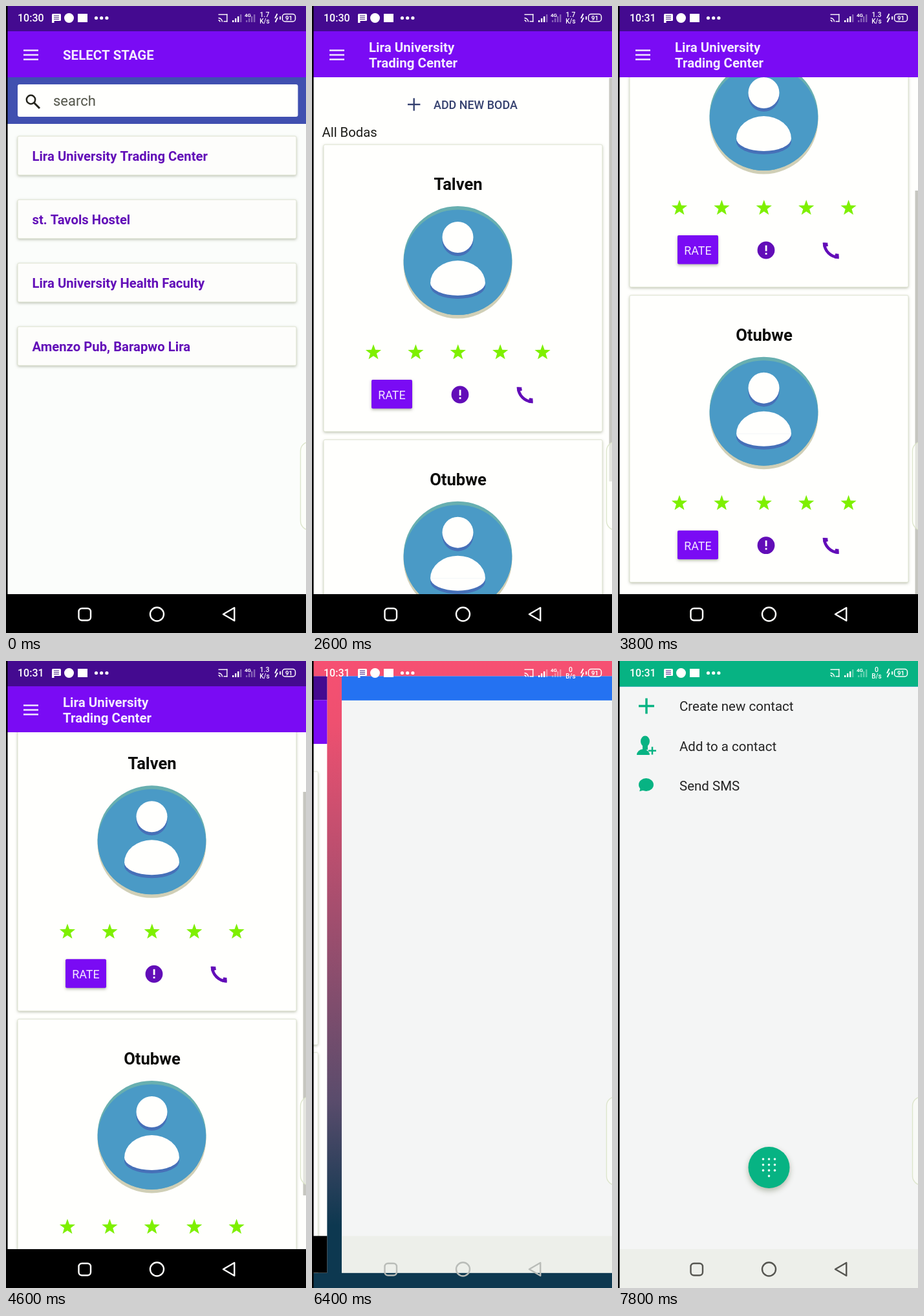
An HTML page with a canvas for the animation above (8000 ms loop, 464 px wide and 968 px high).

```html
<!DOCTYPE html>
<html lang="en">
<head>
<meta charset="utf-8">
<title>Stage picker</title>
<style>
  html, body { margin: 0; width: 100%; height: 100%; overflow: hidden; background: #000; }
  canvas { display: block; width: 464px; height: 968px; }
</style>
</head>
<body>
<canvas id="stage" width="464" height="968"></canvas>
<script>
const ctx = document.getElementById('stage').getContext('2d');
const W = 464, H = 968, LOOP = 8000, STEP = 200;
const STATUS_H = 39, BAR_BOTTOM = 110, NAV_TOP = 908;
const PURPLE = '#7a0bf4', DEEP_PURPLE = '#440a90', INK_PURPLE = '#620db8';
const PAGE = '#fbfdfb', WHITE = '#fffffd', PAPER = '#f4f5f5', GREEN = '#07b383';
const NAVY = '#35416f', BLUE = '#4a9ac6', SHADE = '#4670b8';

const ramp = (t, from, to) => Math.min(1, Math.max(0, (t - from) / (to - from)));
const smooth = (t, from, to) => {
  const p = ramp(t, from, to);
  return p * p * (3 - 2 * p);
};
const repeat = (count, draw) => {
  for (let i = 0; i < count; i++) draw(i);
};

function layer(draw) {
  ctx.save();
  draw();
  ctx.restore();
}

function fade(alpha, draw) {
  layer(() => {
    ctx.globalAlpha *= alpha;
    draw();
  });
}

function rect(x, y, w, h, color) {
  ctx.fillStyle = color;
  ctx.fillRect(x, y, w, h);
}

function box(x, y, w, h, radius, color) {
  ctx.beginPath();
  ctx.roundRect(x, y, w, h, radius);
  ctx.fillStyle = color;
  ctx.fill();
}

function outline(color, width) {
  ctx.strokeStyle = color;
  ctx.lineWidth = width;
  ctx.stroke();
}

function oval(x, y, rx, ry, color, from = 0, to = 2 * Math.PI) {
  ctx.beginPath();
  ctx.ellipse(x, y, rx, ry, 0, from, to);
  ctx.fillStyle = color;
  ctx.fill();
}

const disc = (x, y, r, color) => oval(x, y, r, r, color);

function arc(x, y, r, color, width, from = 0, to = 2 * Math.PI) {
  ctx.beginPath();
  ctx.arc(x, y, r, from, to);
  outline(color, width);
}

function line(x0, y0, x1, y1, color, width) {
  ctx.beginPath();
  ctx.moveTo(x0, y0);
  ctx.lineTo(x1, y1);
  outline(color, width);
}

function plus(x, y, r, color, width) {
  line(x - r, y, x + r, y, color, width);
  line(x, y - r, x, y + r, color, width);
}

// Corners at equal angles; their distances cycle through the given radii.
function polygon(x, y, corners, start, ...radii) {
  ctx.beginPath();
  repeat(corners, i => {
    const angle = start + i * 2 * Math.PI / corners, r = radii[i % radii.length];
    ctx.lineTo(x + r * Math.cos(angle), y + r * Math.sin(angle));
  });
  ctx.closePath();
}

function text(str, x, y, size, color, weight = 400, align = 'left') {
  ctx.font = `${weight} ${size}px Roboto, sans-serif`;
  ctx.textAlign = align;
  ctx.fillStyle = color;
  ctx.fillText(str, x, y);
}

function raised(blur, drop, draw) {
  layer(() => {
    ctx.shadowColor = 'rgba(110,120,90,.5)';
    ctx.shadowBlur = blur;
    ctx.shadowOffsetY = drop;
    draw();
  });
}

function card(y, h, color) {
  raised(4, 1.5, () => box(18, y, 431, h, 2, color));
  outline('#dfe4d2', 1);
}

function header(...titles) {
  rect(0, 0, W, STATUS_H, DEEP_PURPLE);
  rect(0, STATUS_H, W, BAR_BOTTOM - STATUS_H, PURPLE);
  repeat(3, i => rect(27, 67.3 + i * 7, 23, 2.4, '#f4ecff'));
  titles.forEach((title, i) =>
    text(title, 88, 83 + (i - (titles.length - 1) / 2) * 24.5, 20.5, '#f4ecff', 700));
}

function listScreen(rowAlpha) {
  rect(0, 0, W, H, PAGE);
  header('SELECT STAGE');
  rect(0, BAR_BOTTOM, W, 72, '#4050b0');
  box(18, 121, 433.5, 50, 3, WHITE);
  arc(38.5, 144.5, 6.7, '#24241c', 2.5);
  line(43.5, 149.5, 52, 158, '#24241c', 3);
  text('search', 73, 154, 22, '#53554a');
  const names = ['Lira University Trading Center', 'st. Tavols Hostel',
    'Lira University Health Faculty', 'Amenzo Pub, Barapwo Lira'];
  names.forEach((name, i) => {
    const y = 201 + i * 98;
    card(y, 60, '#fdfdfb');
    fade(i ? 1 : rowAlpha, () => text(name, 40.5, y + 38, 20.3, INK_PURPLE, 700));
  });
  rect(0, NAV_TOP, W, H - NAV_TOP, '#000');
}

function person(drop, color) {
  disc(225.5, 357 + drop, 24, color);
  oval(225.5, 428 + drop, 42.5, 35, color, Math.PI, 0);
  oval(225.5, 427.5 + drop, 42.5, 19.5, color, 0, Math.PI);
}

function avatar() {
  disc(225.5, 398.5, 84, '#d0cfb6');
  layer(() => {
    disc(225.5, 393, 84, '#68afb0');
    ctx.clip();
    disc(225.5, 398.5, 84, BLUE);
  });
  person(5, SHADE);
  person(0, WHITE);
}

function handset(x, y, color) {
  const right = Math.PI / 2;
  arc(x, y, 22.5, color, 4.5, right, 2 * right);
  arc(x, y, 21, color, 7.5, right, right + .3);
  arc(x, y, 21, color, 7.5, 2 * right - .3, 2 * right);
}

function riderCard(name) {
  card(214, 443, WHITE);
  text(name, 226, 284, 25.6, '#0c0c0a', 700, 'center');
  avatar();
  repeat(5, i => {
    polygon(95 + i * 65.4, 535, 10, -Math.PI / 2, 12.7, 5.2);
    ctx.fillStyle = '#7ef000';
    ctx.fill();
  });
  raised(4, 2, () => box(92, 577, 63, 44.5, 2, PURPLE));
  text('RATE', 123.5, 607, 17.9, '#f4ecff', 400, 'center');
  disc(229, 600, 13.4, INK_PURPLE);
  rect(227.7, 592.5, 2.8, 9, WHITE);
  rect(227.7, 604, 2.8, 2.8, WHITE);
  handset(341.5, 588.5, INK_PURPLE);
}

function riderScreen(scroll, barAlpha) {
  rect(0, 0, W, H, WHITE);
  layer(() => {
    ctx.translate(0, -scroll);
    plus(157.7, 152, 9.7, NAVY, 2.4);
    text('ADD NEW BODA', 188, 159, 17.9, NAVY, 500);
    text('All Bodas', 15.5, 202, 20.3, '#1c1c18');
    riderCard('Talven');
    ctx.translate(0, 455.7);
    riderCard('Otubwe');
  });
  fade(barAlpha, () => rect(459.5, 111 + scroll * .78, 4.5, 623, '#c6c6c0'));
  header('Lira University', 'Trading Center');
  rect(0, NAV_TOP, W, H - NAV_TOP, '#000');
}

function contactIcon(x, y) {
  oval(x - 2, y - 7, 7, 8.5, GREEN);
  rect(x - 6, y - 2, 8, 8, GREEN);
  oval(x - 5, y + 14, 10, 9, GREEN, Math.PI, 0);
  plus(x + 9, y + 7.5, 6, GREEN, 2.5);
}

function bubbleIcon(x, y) {
  oval(x, y, 11.5, 10, GREEN);
  polygon(x - 6, y + 6, 3, Math.PI * .75, 6);
  ctx.fill();
}

function keypadButton(x, y) {
  raised(10, 4, () => disc(x, y, 32, GREEN));
  repeat(10, i => {
    const column = i < 9 ? i % 3 - 1 : 0, row = Math.floor(i / 3);
    disc(x + column * 9, y - 13 + row * 8.7, 1.8, '#f0fff8');
  });
}

function dialerScreen(menuAlpha) {
  rect(0, 0, W, H, PAPER);
  rect(0, 0, W, STATUS_H + .5, '#2472f2');
  rect(0, NAV_TOP, W, H - NAV_TOP, '#edefea');
  fade(menuAlpha, () => {
    rect(0, 0, W, STATUS_H + .5, GREEN);
    plus(44, 69.5, 12, GREEN, 3.5);
    contactIcon(44, 131);
    bubbleIcon(43.5, 191);
    ['Create new contact', 'Add to a contact', 'Send SMS']
      .forEach((label, i) => text(label, 95, 77 + i * 61.5, 20.5, '#242424'));
    keypadButton(233.5, 782);
  });
}

function signal(x, alpha) {
  repeat(4, i => fade(i < 3 ? alpha : .35, () =>
    rect(x + i * 4, 22 - i * 3, 2.4, 3 + i * 3, WHITE)));
}

function castIcon(x, y) {
  rect(x, y, 14, 1.4, WHITE);
  rect(x + 12.6, y, 1.4, 12, WHITE);
  rect(x + 8, y + 10.6, 6, 1.4, WHITE);
  repeat(2, i => arc(x, y + 12, 2.5 + i * 3.5, WHITE, 1.4, -Math.PI / 2, 0));
}

function statusBar(clock, speed, unit) {
  text(clock, 18, 24, 16, WHITE, 500);
  box(71, 12, 14, 11, 1.5, WHITE);
  rect(71, 21, 3.5, 5, WHITE);
  repeat(3, i => rect(74, 14.4 + i * 2.7, 8, 1.2, '#63449a'));
  disc(97.5, 18.5, 7.5, WHITE);
  rect(111, 12, 15, 13, WHITE);
  repeat(3, i => disc(139.5 + i * 8.2, 18.5, 2.6, WHITE));

  castIcon(328.5, 12.5);
  signal(350, 1);
  signal(371, .35);
  text('4G', 374, 17, 8, WHITE, 700, 'center');
  text(speed, 400, 17, 10.5, WHITE, 500, 'center');
  text(unit, 400, 27, 10, WHITE, 500, 'center');
  line(419.5, 12, 416, 19, WHITE, 1.8);
  line(420, 18, 416.5, 25, WHITE, 1.8);
  rect(423.2, 16, 1.8, 5, WHITE);
  box(427.5, 12.5, 20, 11.5, 4, 'transparent');
  outline(WHITE, 1.5);
  text('91', 437.5, 22, 9.5, WHITE, 700, 'center');
}

function navButtons(color) {
  ctx.lineJoin = 'round';
  box(112.5, 930, 18.5, 18.5, 5, 'transparent');
  outline(color, 2.4);
  arc(233.5, 939, 10.5, color, 2.4);
  polygon(347.5, 939, 3, Math.PI, 11.5);
  outline(color, 2.4);
}

function edgeHandle() {
  box(455.5, 673, 30, 136, 14, 'rgba(253,255,250,.55)');
  outline('#dde5cc', 1.4);
}

function wallpaper() {
  const gradient = ctx.createLinearGradient(0, 0, 0, H);
  gradient.addColorStop(0, '#f65072');
  gradient.addColorStop(.1, '#ee5070');
  gradient.addColorStop(.7, '#5a4c6c');
  gradient.addColorStop(.9, '#0d3850');
  rect(0, 0, W, H, gradient);
}

function panel(shift, zoom, draw) {
  layer(() => {
    ctx.translate(W / 2 + shift, H / 2);
    ctx.scale(zoom, zoom);
    ctx.translate(-W / 2, -H / 2);
    ctx.beginPath();
    ctx.rect(0, 0, W, H);
    ctx.clip();
    draw();
  });
}

function render(t) {
  const rowAlpha = 1 - .8 * (ramp(t, 1200, 1400) - ramp(t, 1600, 2000));
  const enter = ramp(t, 1800, 2400);
  const scroll = 223 * smooth(t, 2800, 3800) - 164 * smooth(t, 4000, 5000);
  const barAlpha = ramp(t, 2200, 2400) - ramp(t, 5400, 5800);
  const shift = W * (1 - ramp(t, 5800, 6600)) ** 1.87;
  const zoom = 1 - .048 * (ramp(t, 5800, 6000) - ramp(t, 6400, 6600));

  if (t < 5800) {
    if (enter < 1) listScreen(rowAlpha);
    fade(enter, () => {
      ctx.translate(0, (1 - enter) * 60);
      riderScreen(scroll, barAlpha);
    });
    rect(0, NAV_TOP, W, H - NAV_TOP, '#000');
  } else {
    wallpaper();
    panel(shift - W, zoom, () => riderScreen(scroll, barAlpha));
    panel(shift, zoom, () => dialerScreen(ramp(t, 6600, 7000)));
  }

  const idle = t >= 6200, later = t >= 3400;
  statusBar(later ? '10:31' : '10:30', idle ? '0' : later ? '1.3' : '1.7', idle ? 'B/s' : 'K/s');
  navButtons(!idle ? WHITE : t < 6600 ? '#b9bcb8' : '#555550');
  edgeHandle();
  rect(0, 0, 2.5, H, '#000');
}

function frame(now) {
  const t = now % LOOP;
  render(t - t % STEP);
  requestAnimationFrame(frame);
}
requestAnimationFrame(frame);
</script>
</body>
</html>
```
